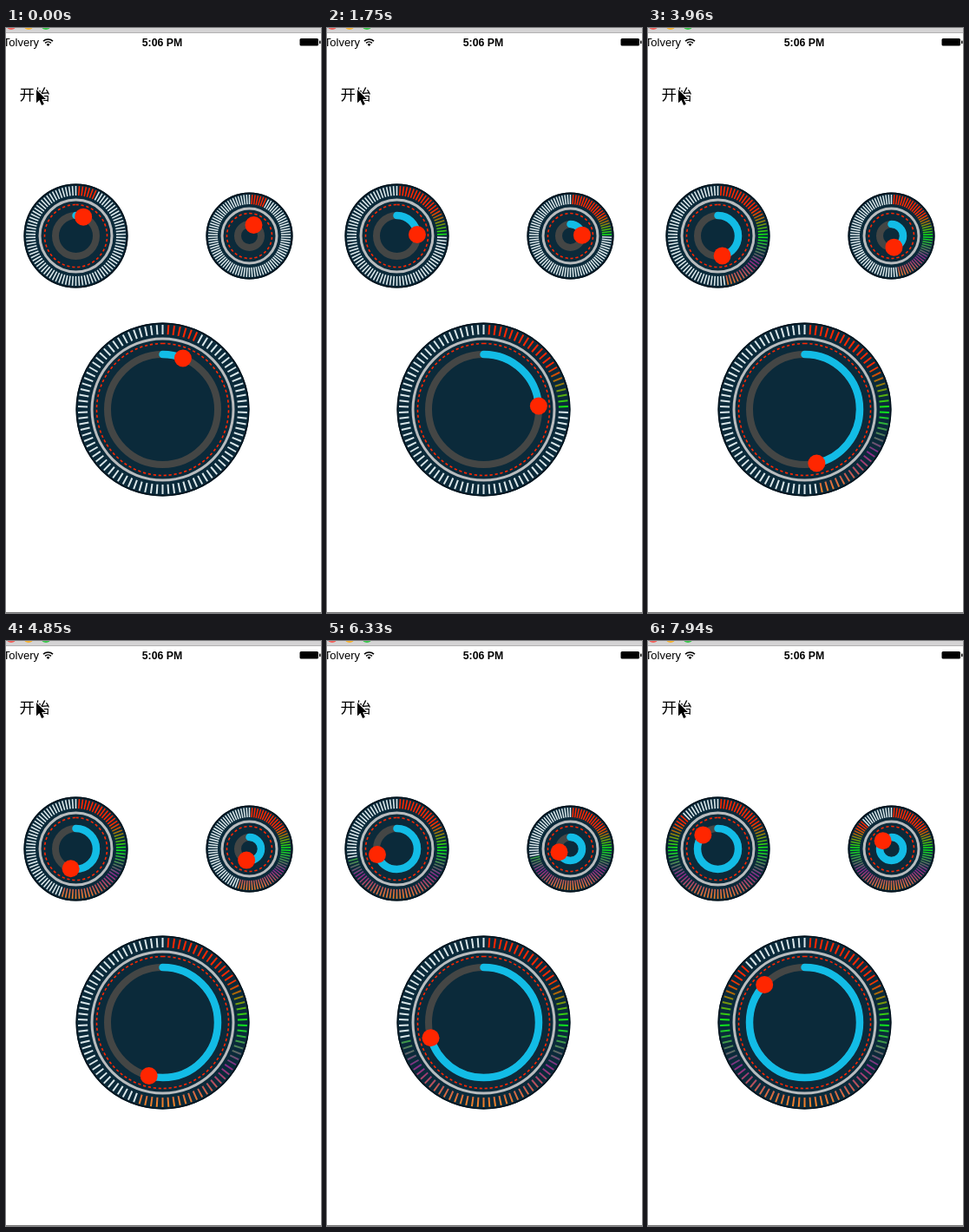
Recreate the animation shown at these times as an HTML page with a canvas. Size 363x674 px, loop 8 s.

```html
<!DOCTYPE html>
<html lang="zh">
<head>
<meta charset="utf-8">
<title>Dials</title>
<style>
html, body { margin: 0; width: 100%; height: 100%; overflow: hidden; background: #fff; }
canvas { display: block; }
</style>
</head>
<body>
<canvas id="stage" width="363" height="674"></canvas>
<script>
const ctx = document.getElementById('stage').getContext('2d');
const TAU = Math.PI * 2;
const LOOP = 8000;
const STEP = 5.4;          // degrees per step
const START = 21.6;
const TICKS = 90;
const RED = '#ff2600';
const DIALS = [
  { x: 80.5, y: 239.5, r: 60 },
  { x: 280.5, y: 239.5, r: 50 },
  { x: 180.5, y: 439.5, r: 100 }
];

// Step number and the time it begins; steps between are evenly spaced.
const KEYS = [
  [0, 0], [1, 140], [8, 1160], [9, 1310], [16, 2340], [17, 2480], [19, 2780],
  [20, 2920], [24, 3510], [25, 3660], [31, 4560], [32, 4710], [39, 5740],
  [40, 5890], [47, 6920], [48, 7070], [54, 7940], [55, 8090]
];
const stepTimes = [];
for (let k = 0; k < KEYS.length - 1; k++) {
  const [n0, t0] = KEYS[k], [n1, t1] = KEYS[k + 1];
  for (let n = n0; n < n1; n++) {
    stepTimes[n] = Math.round((t0 + (t1 - t0) * (n - n0) / (n1 - n0)) / 10) * 10;
  }
}

function angleAt(t) {
  let n = stepTimes.length - 1;
  while (n > 0 && stepTimes[n] > t) n--;
  return START + n * STEP;
}

// Degrees clockwise from the top to canvas radians.
const rad = deg => (deg - 90) * Math.PI / 180;

function disc(x, y, r, fill) {
  ctx.beginPath();
  ctx.arc(x, y, r, 0, TAU);
  ctx.fillStyle = fill;
  ctx.fill();
}

function arc(r, from, to, width, color, cap = 'butt') {
  ctx.beginPath();
  ctx.arc(0, 0, r, rad(from), rad(to));
  ctx.lineWidth = width;
  ctx.strokeStyle = color;
  ctx.lineCap = cap;
  ctx.stroke();
}

function ticks(r, first, last, color) {
  ctx.beginPath();
  for (let i = first; i <= last; i++) {
    const a = rad(i * 360 / TICKS), c = Math.cos(a), s = Math.sin(a);
    ctx.moveTo(c * (r - 13.5), s * (r - 13.5));
    ctx.lineTo(c * (r - 2.5), s * (r - 2.5));
  }
  ctx.lineWidth = 1 + r / 100;
  ctx.lineCap = 'butt';
  ctx.strokeStyle = color;
  ctx.stroke();
}

function rainbow(r) {
  const g = ctx.createLinearGradient(0, -r, 0, r);
  [RED, '#05f016', '#86288a', '#ff8c1a'].forEach((c, i) => g.addColorStop((i + 1) / 4, c));
  return g;
}

function dial({ x, y, r }, angle) {
  ctx.save();
  ctx.translate(x, y);
  disc(0, 0, r, '#0b2a3a');
  arc(r - 0.7, 0, 360, 1.4, '#03111a');

  const lit = Math.floor((angle + 2.5) * TICKS / 360);
  ticks(r, lit + 1, TICKS, '#d9e6e9');
  ticks(r, 1, lit, rainbow(r));

  arc(r - 18.5, 0, 360, 3, '#b9bcbe');
  ctx.setLineDash([3.2, 2.8]);
  arc(r - 24, 0, 360, 1.6, RED);
  ctx.setLineDash([]);

  const track = r - 36.5;
  arc(track, 0, 360, 8, '#444645');
  arc(track, 0, angle, 8.5, '#12bce6', 'round');
  disc(track * Math.cos(rad(angle)), track * Math.sin(rad(angle)), 10, RED);
  ctx.restore();
}

function label(text, x, y, font, align) {
  ctx.font = font;
  ctx.textAlign = align;
  ctx.fillStyle = '#000';
  ctx.fillText(text, x, y);
}

function wifi(x, y) {
  ctx.save();
  ctx.translate(x, y);
  arc(8, -43, 43, 1.6, '#000');
  arc(5, -43, 43, 1.6, '#000');
  ctx.beginPath();
  ctx.moveTo(0, 0);
  ctx.arc(0, 0, 2.8, rad(-43), rad(43));
  ctx.fillStyle = '#000';
  ctx.fill();
  ctx.restore();
}

function battery() {
  ctx.beginPath();
  ctx.roundRect(338.5, 12, 21.5, 8.5, 1.5);
  ctx.roundRect(361, 14.5, 1.5, 3.5, 0.5);
  ctx.fillStyle = '#000';
  ctx.fill();
}

function cursor(x, y) {
  const path = new Path2D('M0 0V15.2L3.5 12L6.1 18L8.8 16.8L6.2 11H11Z');
  ctx.save();
  ctx.translate(x, y);
  ctx.lineWidth = 2;
  ctx.lineJoin = 'round';
  ctx.strokeStyle = '#fff';
  ctx.stroke(path);
  ctx.fillStyle = '#000';
  ctx.fill(path);
  ctx.restore();
}

function frame() {
  ctx.fillStyle = '#fff';
  ctx.fillRect(0, 0, 363, 674);
  ctx.fillStyle = '#d4d3d4';
  ctx.fillRect(0, 0, 363, 5);
  ctx.fillStyle = '#b2b1b2';
  ctx.fillRect(0, 5, 363, 1);
  ['#f4605a', '#f8b32f', '#38c74a'].forEach((c, i) => disc(6 + i * 20, -4, 6, c));
  ctx.fillStyle = '#777';
  ctx.fillRect(0, 673, 363, 1);

  label('Tolvery', 38, 21, '13px "Liberation Sans", sans-serif', 'right');
  wifi(48.5, 21);
  label('5:06 PM', 180, 21, 'bold 12.3px "Liberation Sans", sans-serif', 'center');
  battery();
  label('开始', 15.5, 82.5, '300 17.5px "Noto Sans CJK SC", "Noto Sans CJK", sans-serif', 'left');

  const angle = angleAt(performance.now() % LOOP);
  DIALS.forEach(d => dial(d, angle));
  cursor(35, 71);
  requestAnimationFrame(frame);
}
frame();
</script>
</body>
</html>
```
